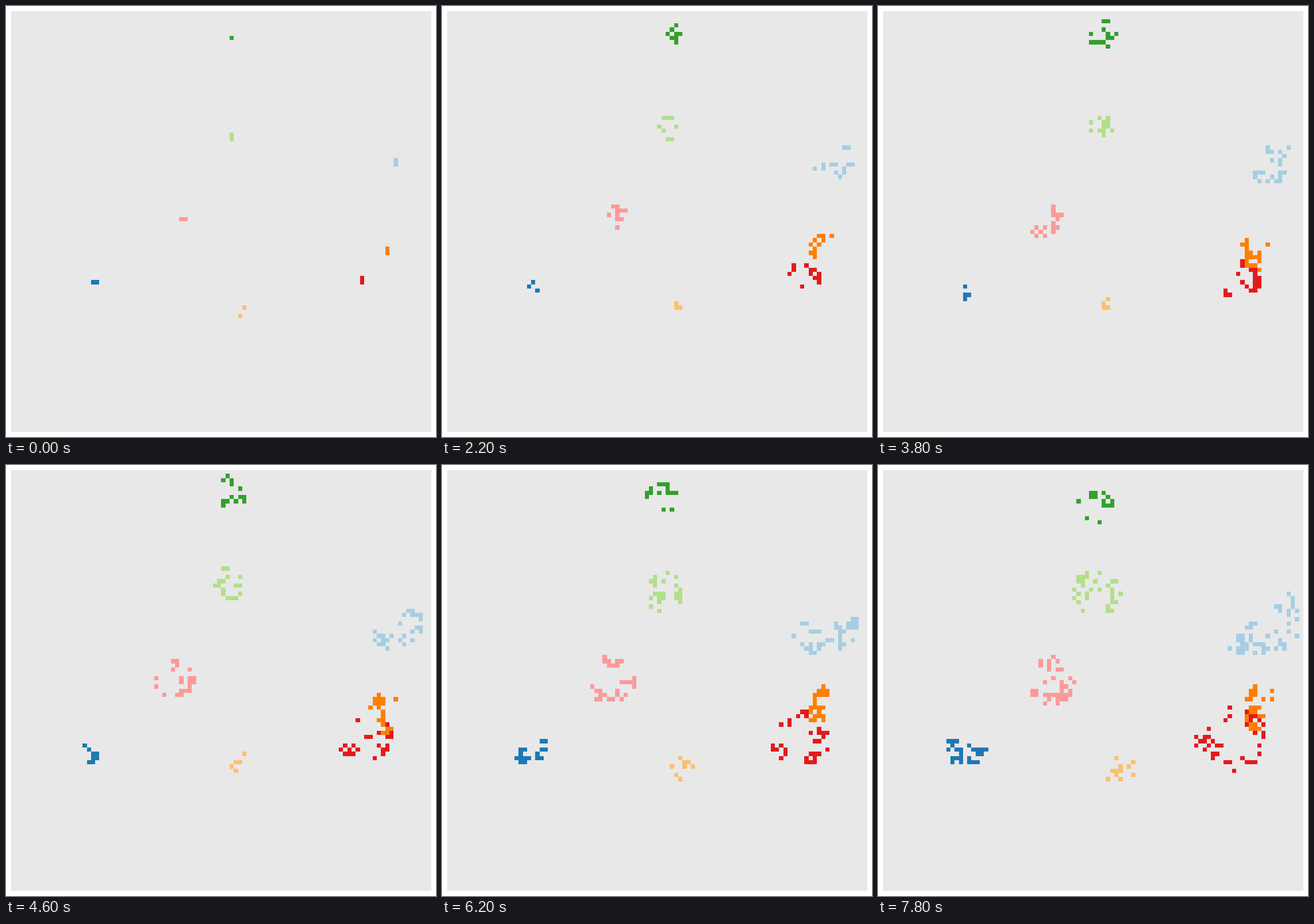
A matplotlib script for the animation above (8000 ms loop, 748x749 px).

```python
import numpy as np
import matplotlib.pyplot as plt
from matplotlib.animation import FuncAnimation
from matplotlib.colors import to_rgb

W, H, DPI = 748, 749, 64
SIDE, GRID = 731, 100
FRAMES, STEP_MS = 40, 200
HALF, LAST = FRAMES // 2 - 1, FRAMES - 1
NEAR = [(i, j) for i in (-1, 0, 1) for j in (-1, 0, 1)]


def grow(start, middle, end, spread=1.0, seed=1):
    """Breed cells into neighbouring squares around a drifting centre.

    middle and end give the centre and population (x, y, size);
    the range of a colony follows from its population.
    """
    rng = np.random.default_rng(seed)
    first = (*np.mean(start, axis=0), len(start))
    path = list(zip(first, middle, end))
    cells = set(start)
    history = [cells]
    for t in range(1, FRAMES):
        x, y, size = (np.interp(t, [0, HALF, LAST], key) for key in path)
        radius = spread * np.sqrt(size)

        parents = {}
        for cx, cy in sorted(cells):
            for i, j in NEAR:
                p = (cx + i, cy + j)
                parents[p] = parents.get(p, 0) + 1

        # Squares with many parents fill first, and the rim beats the crowded core.
        score = {}
        for p, count in parents.items():
            d2 = (((p[0] - x) / 1.1) ** 2 + (p[1] - y) ** 2) / radius ** 2
            hold = 0.8 * min(d2, 1) - 8 * max(d2 - 1, 0)
            score[p] = np.log(count) + hold + rng.gumbel()
        ranked = sorted(score, key=score.get, reverse=True)
        cells = set(ranked[:round(size)])
        history.append(cells)
    return history


colonies = {
    "#a6cee3": grow([(91, 35), (91, 36)], (90, 35, 21), (89, 35, 46), 1.35, seed=1),
    "#1f78b4": grow([(19, 64), (20, 64)], (19, 66, 4), (19, 65, 24), seed=2),
    "#b2df8a": grow([(52, 29), (52, 30)], (52, 26, 12), (50, 29, 30), seed=3),
    "#33a02c": grow([(52, 6)], (52, 4, 13), (50, 8, 14), seed=4),
    "#fb9a99": grow([(40, 49), (41, 49)], (38, 49, 16), (39, 50, 35), seed=5),
    "#e31a1c": grow([(83, 63), (83, 64)], (84, 63, 20), (83, 63, 42), 1.15, seed=6),
    "#fdbf6f": grow([(55, 70), (54, 72)], (54, 69, 4), (56, 71, 11), seed=7),
    "#ff7f00": grow([(89, 56), (89, 57)], (92, 57, 18), (93, 56, 24), 1.4, seed=8),
}

fig = plt.figure(figsize=(W / DPI, H / DPI), dpi=DPI, facecolor="white")
ax = fig.add_axes([9.4 / W, 9.3 / H, SIDE / W, SIDE / H])
ax.axis("off")
blank = np.full((GRID, GRID, 3), to_rgb("#e8e8e8"))
board = ax.imshow(blank, interpolation="nearest", aspect="auto")


def draw(t):
    grid = blank.copy()
    for color, history in colonies.items():
        for x, y in history[t]:
            grid[y % GRID, x % GRID] = to_rgb(color)
    board.set_data(grid)
    return [board]


anim = FuncAnimation(fig, draw, frames=FRAMES, interval=STEP_MS,
                     repeat=True, repeat_delay=0, blit=False)
plt.show()
```
